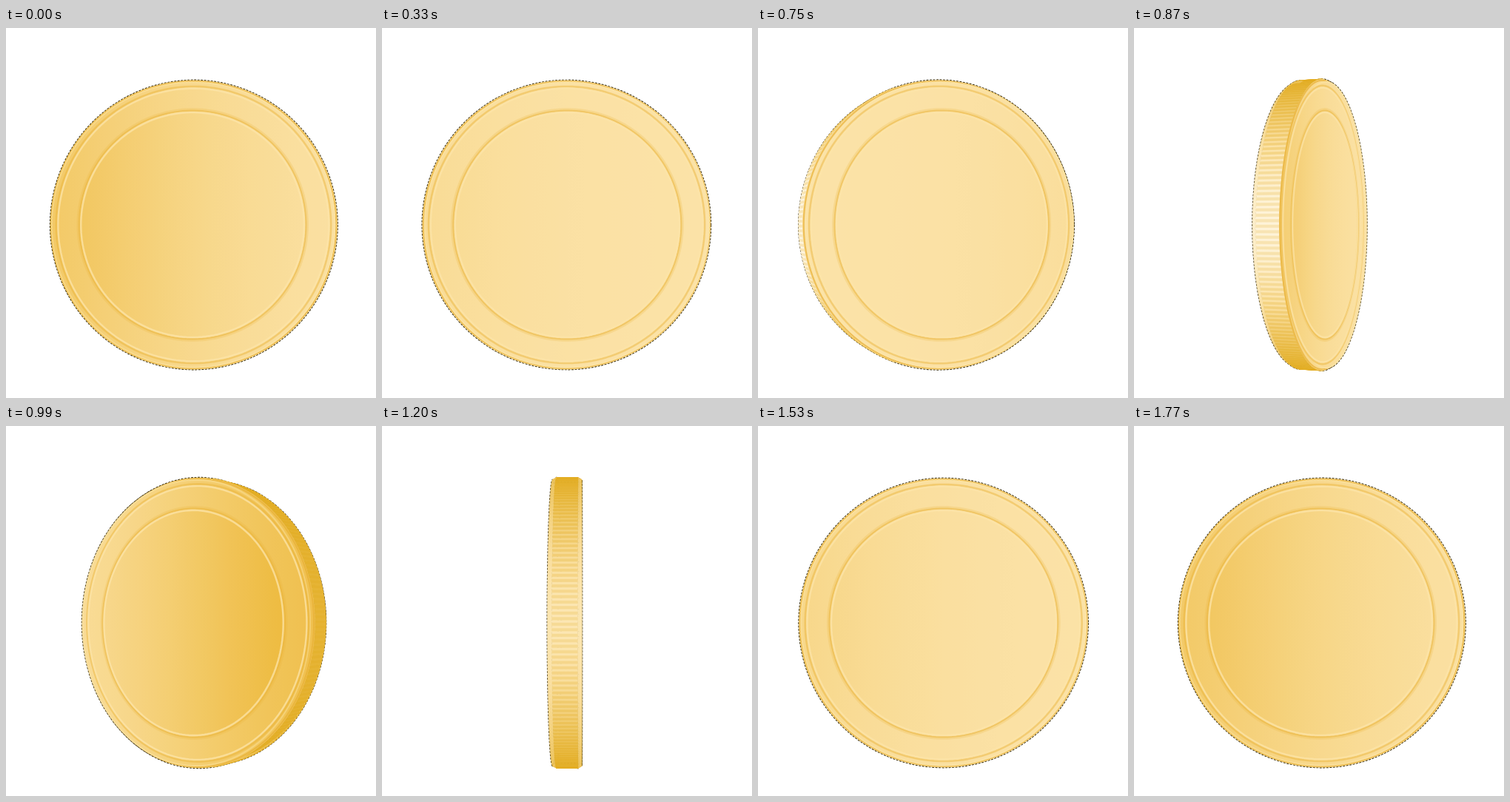
An HTML page with a canvas that plays this animation: 500x500 px, repeating every 1800 ms.

```html
<!DOCTYPE html>
<html lang="en">
<head>
<meta charset="utf-8">
<title>Spinning coin</title>
<style>
html, body { margin: 0; width: 100%; height: 100%; overflow: hidden; background: #fff; }
canvas { display: block; width: 500px; height: 500px; }
</style>
</head>
<body>
<canvas id="stage" width="500" height="500"></canvas>
<script>
const ctx = document.getElementById('stage').getContext('2d');
const LOOP = 1800, STEP = 30;
const CX = 251, CY = 266, R = 192.7, DEPTH = 1000;
const FLAT = 14;                 // half height of the ribbed wall and of the face
const LIP = 19, LIP_R = 0.985;   // raised, rounded rim
const RIBS = 200;
const DARK = [235, 179, 44], LIGHT = [251, 226, 167], WHITE = [255, 250, 238];
const DEEP = [224, 168, 24];

// time, angle in degrees, speed in degrees per ms
const KEYS = [
  [-15, 7, 0], [330, -4, -0.01], [600, -5, -0.02], [750, -20.5, -0.3],
  [990, -143, -0.605], [1200, -269, -0.555], [1380, -344, -0.27],
  [1510, -361, 0], [1785, -353, 0], [2130, -364, -0.01]
];

function angleAt(t) {
  let i = 0;
  while (t >= KEYS[i + 1][0]) i++;
  const [t0, a, va] = KEYS[i], [t1, b, vb] = KEYS[i + 1];
  const d = t1 - t0, u = (t - t0) / d, u2 = u * u, u3 = u2 * u;
  return a * (2 * u3 - 3 * u2 + 1) + va * d * (u3 - 2 * u2 + u) +
         b * (3 * u2 - 2 * u3) + vb * d * (u3 - u2);
}

const mod = (x, n) => ((x % n) + n) % n;
const clamp = (x, a, b) => Math.min(b, Math.max(a, x));
const mix = (a, b, k) => a.map((v, i) => v + (b[i] - v) * k);
const css = c => `rgb(${c.map(Math.round).join()})`;

function gold(b, dark = DARK) {
  return b <= 1 ? mix(dark, LIGHT, Math.max(0, b)) : mix(LIGHT, WHITE, Math.min(1, (b - 1) * 2));
}

// soft dark band sweeping over the face as it turns
function sheen(u) {
  const d = mod(u + 2.8 + 4.3, 8.6) - 4.3;
  return 1 - 0.92 * Math.exp(-Math.pow(d / 1.8, 2));
}

function coin(deg) {
  const alpha = mod(deg + 90, 180) - 90;
  const rad = alpha * Math.PI / 180, c = Math.cos(rad), s = Math.sin(rad);

  function project(phi, rho, w) {
    const a = rho * R * Math.cos(phi);
    const k = 1 / (1 - (a * s + w * c) / DEPTH);
    return [CX + (a * c - w * s) * k, CY + rho * R * Math.sin(phi) * k];
  }

  function ring(rho, w) {
    ctx.beginPath();
    for (let i = 0; i < 180; i++) ctx.lineTo(...project(i * Math.PI / 90, rho, w));
    ctx.closePath();
  }

  function line(rho, w, color, width, opacity) {
    ring(rho, w);
    ctx.globalAlpha = opacity;
    ctx.strokeStyle = color;
    ctx.lineWidth = width;
    ctx.stroke();
    ctx.globalAlpha = 1;
  }

  function quad(p0, p1, [r0, w0], [r1, w1], color) {
    ctx.beginPath();
    ctx.lineTo(...project(p0, r0, w0));
    ctx.lineTo(...project(p0, r1, w1));
    ctx.lineTo(...project(p1, r1, w1));
    ctx.lineTo(...project(p1, r0, w0));
    ctx.closePath();
    ctx.fillStyle = ctx.strokeStyle = css(color);
    ctx.lineWidth = 0.5;
    ctx.fill();
    ctx.stroke();
  }

  function outline() {
    ctx.setLineDash([3, 1.5]);
    ctx.strokeStyle = '#3c300e';
    ctx.lineWidth = 1.9;
    for (const side of [-1, 1]) {
      ring(1, side * FLAT);
      ctx.stroke();
      ring(LIP_R, side * LIP);
      ctx.stroke();
      ctx.beginPath();
      ctx.moveTo(...project(side * Math.PI / 2, LIP_R, -LIP));
      ctx.lineTo(...project(side * Math.PI / 2, LIP_R, LIP));
      ctx.stroke();
    }
    ctx.setLineDash([]);
  }

  function wall() {
    const d = 2 * Math.PI / RIBS;
    for (let i = 0; i < RIBS; i++) {
      const phi = i * d, nx = Math.cos(phi) * c, ny = Math.sin(phi), nz = Math.cos(phi) * s;
      if (nz < R / DEPTH - 0.06) continue;
      const b = (1 - ny * ny) * (0.95 * nz - 0.6 * Math.max(nx, 0) + 1.1 * Math.max(-nx, 0));
      const base = gold(clamp(b + 0.12, 0, 1.4), DEEP);
      const p0 = phi - d / 2, p1 = phi + d / 2;
      for (const side of [-1, 1]) {
        quad(p0, p1, [LIP_R, side * LIP], [1, side * FLAT], mix(base, LIGHT, 0.35));
      }
      quad(p0, p1, [1, -FLAT], [1, FLAT], base);
      quad(p0, phi, [1, -FLAT], [1, FLAT], mix(base, DEEP, 0.2 + 0.3 * ny * ny));
    }
  }

  function shade(lift) {
    const x0 = project(Math.PI, 1, FLAT)[0], x1 = project(0, 1, FLAT)[0];
    const g = ctx.createLinearGradient(x0, 0, x1, 0);
    for (let i = 0; i <= 16; i++) {
      const b = sheen(i / 8 - 1 - alpha / 9);
      g.addColorStop(i / 16, css(gold(b + (1 - b) * lift)));
    }
    return g;
  }

  function disc(rho, w, fill) {
    ring(rho, w);
    ctx.fillStyle = fill;
    ctx.fill();
  }

  function face() {
    const rim = shade(0.2), dark = '#e9b136', light = '#fce5a9';
    disc(1, FLAT, rim);
    line(0.992, FLAT, dark, 2.2, 0.7);
    disc(LIP_R, LIP, rim);
    line(0.98, LIP, light, 2, 0.4);
    disc(0.955, FLAT, rim);
    line(0.957, FLAT, dark, 2.6, 0.45);
    line(0.943, FLAT, light, 2.4, 0.75);
    disc(0.78, FLAT, shade(0));
    line(0.797, FLAT, dark, 4, 0.22);
    line(0.79, FLAT, dark, 2.2, 0.45);
    line(0.777, FLAT, light, 2.4, 0.75);
  }

  outline();
  wall();
  if (DEPTH * c > LIP) face();
}

function draw(now) {
  const t = Math.floor(mod(now, LOOP) / STEP) * STEP;
  ctx.fillStyle = '#fff';
  ctx.fillRect(0, 0, 500, 500);
  ctx.lineJoin = 'round';
  coin(angleAt(t));
}

let start = null;
function tick(now) {
  if (start === null) start = now;
  draw(now - start);
  requestAnimationFrame(tick);
}
draw(0);
requestAnimationFrame(tick);
</script>
</body>
</html>
```
